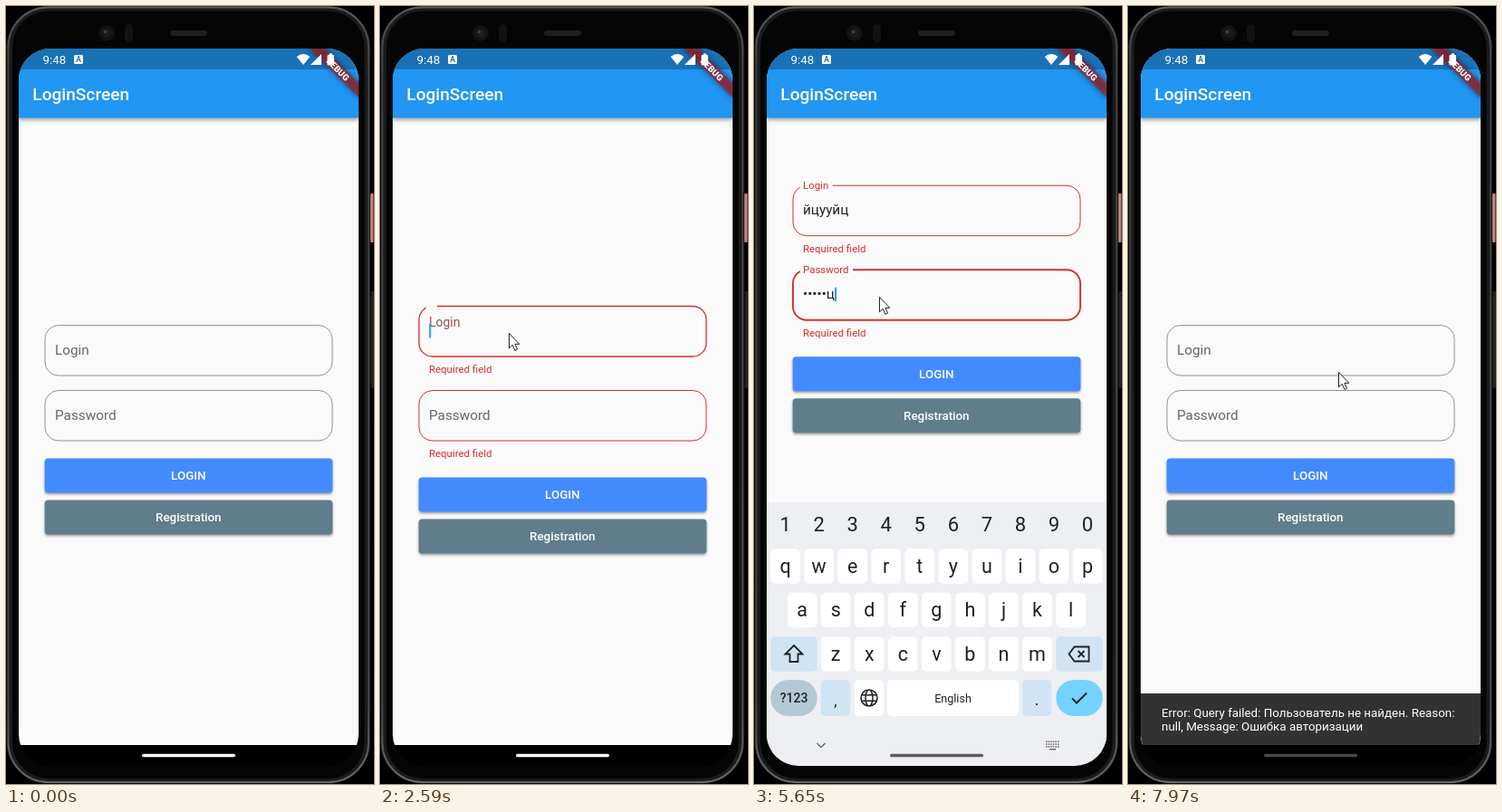
Write an HTML page with a canvas that moves like this. It is 406 px wide and 859 px high and loops after 8 s.

```html
<!DOCTYPE html>
<html lang="en">
<head>
<meta charset="utf-8">
<title>Login screen</title>
<style>
html, body { margin: 0; width: 100%; height: 100%; overflow: hidden; background: #000; }
canvas { display: block; width: 406px; height: 859px; }
</style>
</head>
<body>
<canvas id="stage"></canvas>
<script>
const W = 406, H = 859, LOOP = 8000;
const canvas = document.getElementById('stage');
const c = canvas.getContext('2d');
const dpr = window.devicePixelRatio || 1;
canvas.width = W * dpr;
canvas.height = H * dpr;

const RED = '#d32f2f', BLUE = '#2196f3', INK = '#202124';
const SCREEN = { x: 14, y: 47, w: 375, h: 792, r: 35 };

const clamp = v => Math.max(0, Math.min(1, v));
const ramp = (t, a, b) => clamp((t - a) / (b - a));
const mix = (a, b, k) => a + (b - a) * k;
const smooth = k => k * k * (3 - 2 * k);
const easeOut = k => 1 - (1 - k) ** 3;

// Cubic bezier (.4, 0, .2, 1)
function standard(k) {
  let lo = 0, hi = 1;
  for (let i = 0; i < 16; i++) {
    const m = (lo + hi) / 2, n = 1 - m;
    if (1.2 * n * n * m + 0.6 * n * m * m + m ** 3 < k) lo = m; else hi = m;
  }
  return 3 * lo * lo - 2 * lo ** 3;
}

function font(size, weight = 400) {
  c.font = `${weight} ${size}px Roboto, sans-serif`;
}
function text(s, x, y, size, color, weight, align = 'left') {
  font(size, weight);
  c.fillStyle = color;
  c.textAlign = align;
  c.fillText(s, x, y);
}
function box(x, y, w, h, r) {
  c.beginPath();
  c.roundRect(x, y, w, h, r);
}
function fillBox(x, y, w, h, r, color) {
  box(x, y, w, h, r);
  c.fillStyle = color;
  c.fill();
}
function strokeBox(x, y, w, h, r, width, color) {
  box(x, y, w, h, r);
  c.lineWidth = width;
  c.strokeStyle = color;
  c.stroke();
}
function dot(x, y, r, color) {
  c.beginPath();
  c.arc(x, y, r, 0, 7);
  c.fillStyle = color;
  c.fill();
}
function line(d, x, y, width = 1.6, color = INK) {
  c.save();
  c.translate(x, y);
  c.lineWidth = width;
  c.strokeStyle = color;
  c.stroke(new Path2D(d));
  c.restore();
}
function shape(d, x, y, color) {
  c.save();
  c.translate(x, y);
  c.fillStyle = color;
  c.fill(new Path2D(d));
  c.restore();
}
function shadow(blur, y, color) {
  c.shadowBlur = blur * dpr;
  c.shadowOffsetY = y * dpr;
  c.shadowColor = color;
}

function phone() {
  c.fillStyle = '#000';
  c.fillRect(0, 0, W, H);
  fillBox(402, 207, 3.5, 54, 1, '#c0807a');
  fillBox(402.5, 315, 3.5, 107, 1, '#222');
  const gloss = c.createLinearGradient(0, 0, 0, H);
  gloss.addColorStop(0, '#5c5c5c');
  gloss.addColorStop(0.08, '#3c3c3c');
  gloss.addColorStop(0.9, '#444');
  gloss.addColorStop(1, '#6a6a6a');
  fillBox(0.5, 0, 401.5, 858.5, 46, '#1b1b1b');
  strokeBox(2.5, 1.5, 397.5, 855.5, 44, 2, gloss);
  fillBox(7, 5.5, 388.5, 847.5, 40, '#050505');
  dot(111, 30, 9, '#121212');
  dot(111, 30, 5, '#1c1c20');
  dot(109.5, 28.5, 1.6, '#45454c');
  fillBox(131, 20, 9, 20, 4.5, '#121212');
  fillBox(181, 27, 41, 6, 3, '#1e1e1e');
}

function field(f, y) {
  const x = 43, w = 317, r = 15;
  font(15.3);
  const labelWidth = c.measureText(f.label).width * 0.75;
  c.save();
  if (f.float > 0) {
    c.beginPath();
    c.rect(0, y - 10, W, 90);
    c.rect(50.8, y - 4, (labelWidth + 7.6) * f.float, 10);
    c.clip('evenodd');
  }
  strokeBox(x, y, w, 55.5, r, f.focus ? mix(1, 1.9, f.float) : 1, f.error ? RED : '#929292');
  c.restore();

  const k = f.float;
  const color = `rgb(${mix(102, 211, k)},${mix(102, 47, k)},${mix(102, 47, k)})`;
  text(f.label, 54, y + mix(32.4, 4, k), mix(15.3, 11.45, k), color);
  text(f.value, 54, y + 32.2, 15.3, '#222');
  if (f.focus && f.caret) {
    c.fillStyle = BLUE;
    c.fillRect(54.3 + c.measureText(f.value).width, y + 19.5, 1.9, 15.5);
  }
  if (f.error) {
    c.save();
    c.globalAlpha *= f.errorAlpha;
    text('Required field', 54, y + 73.9, 11.45, RED);
    c.restore();
  }
}

function button(label, y, color, ink) {
  c.save();
  shadow(ink ? 5 : 3, ink ? 3 : 1.8, 'rgba(0,0,0,.38)');
  fillBox(42.7, y, 317.6, 38, 3.8, color);
  c.restore();
  if (ink) {
    c.save();
    box(42.7, y, 317.6, 38, 3.8);
    c.clip();
    c.fillStyle = `rgba(255,255,255,${0.11 * ink.alpha})`;
    c.fillRect(42, y, 319, 38);
    dot(ink.x, y + 19, ink.r, `rgba(255,255,255,${0.24 * ink.alpha})`);
    c.restore();
  }
  text(label, 201.3, y + 23.8, 13.36, '#fff', 500, 'center');
}

function page(p) {
  c.fillStyle = '#fafafa';
  c.fillRect(14, 47, 375, 769);
  const up = p.shift, grow = p.error ? 21 : 0;
  field(p.login, 352.5 - grow - up);
  field(p.password, 424.5 - up);
  button('LOGIN', 499.5 + grow - up, '#448aff', p.ink);
  button('Registration', 545.5 + grow - up, '#607d8b');
  c.save();
  shadow(4, 2, 'rgba(0,0,0,.35)');
  c.fillStyle = BLUE;
  c.fillRect(14, 47, 375, 76.5);
  c.restore();
  c.fillStyle = 'rgb(25,113,182)';
  c.fillRect(14, 47, 375, 23);
  text('LoginScreen', 29.3, 104, 19.1, '#fff', 500);
}

function banner() {
  c.save();
  c.translate(389, 47);
  c.rotate(Math.PI / 4);
  c.save();
  shadow(6, 0, 'rgba(0,0,0,.8)');
  c.fillStyle = 'rgba(183,28,28,.63)';
  c.fillRect(-38.2, 26.7, 76.4, 11.45);
  c.restore();
  text('DEBUG', 0, 35.9, 9.7, '#fff', 900, 'center');
  c.restore();
}

function statusBar() {
  text('9:48', 40.5, 64, 13.4, '#fff');
  fillBox(75, 54, 10, 10, 1.5, '#fff');
  text('A', 80, 62.2, 8.5, 'rgb(25,113,182)', 700, 'center');
  shape('M0 6L-7.3-3Q0-9 7.3-3Z', 328, 59, '#fff');
  shape('M6-6V6H-6Z', 342, 59, '#fff');
  fillBox(354.5, 54, 7.5, 11.5, 1, '#fff');
  c.fillRect(356.7, 52.4, 3.2, 2);
}

function key(x, y, w, color = '#fff', h = 38.5, r = 5) {
  fillBox(x - w / 2, y - h / 2, w, h, r, color);
}

function toolbar() {
  dot(36, 570.5, 14.5, '#74d2ff');
  line('M2-4.5l-4.5 4.5 4.5 4.5', 37, 570.5, 1.8);
  line('M-8-6q0-2 2-2h12q2 0 2 2v8l-6 6h-8q-2 0-2-2zM2 8v-4q0-2 2-2h4M-4 1q3 4 6 1', 89, 570.5, 1.8);
  dot(86, 568, 1.2, INK);
  dot(92, 568, 1.2, INK);
  text('GIF', 142, 575.2, 13, INK, 900, 'center');
  line('M-6.5-7h13v14.5h-13zM-2.5-7v-2h5v2M-3.5-2.5h7M-3.5.5h7M-3.5 3.5h4', 195, 570.5, 1.7);
  c.save();
  c.translate(247.5, 570.5);
  c.lineWidth = 4.4;
  c.strokeStyle = c.fillStyle = INK;
  c.beginPath();
  c.arc(0, 0, 4.7, 0, 7);
  c.stroke();
  for (let i = 0; i < 6; i++) {
    c.rotate(Math.PI / 3);
    c.fillRect(-2.2, -8.6, 4.4, 3);
  }
  c.restore();
  c.fillStyle = '#c9cbd0';
  c.fillRect(280, 560.5, 1, 20);
  for (let i = -1; i < 2; i++) dot(313 + i * 5.3, 570.5, 1.7, INK);
  fillBox(364, 561.5, 6, 11.5, 3, INK);
  line('M-5.8-1.5a5.8 5.8 0 0 0 11.6 0M0 4.5v4', 367, 571, 1.8);
}

function keyboard(english) {
  c.fillStyle = '#eeeff2';
  c.fillRect(14, 548, 375, 300);
  const step = 37.05, digits = '1234567890';
  if (!english) toolbar();
  [...'qwertyuiop'].forEach((ch, i) => {
    const x = 34.6 + i * step;
    key(x, 618.5, 32.5);
    text(ch, x, 625.5, 21.5, INK, 400, 'center');
    if (english) text(digits[i], x, 580, 22, INK, 400, 'center');
    else text(digits[i], x + 11.5, 610.5, 9, '#333', 400, 'center');
  });
  [['asdfghjkl', 53.2, 667], ['zxcvbnm', 90.2, 715.5]].forEach(([row, x0, y]) =>
    [...row].forEach((ch, i) => {
      key(x0 + i * step, y, 32.5);
      text(ch, x0 + i * step, y + 7, 21.5, INK, 400, 'center');
    }));
  const pale = '#d1e4f3';
  key(44, 715.5, 51.5, pale);
  line('M0-9.5l9.5 9.5h-5v8.5h-9v-8.5h-5z', 44, 715.5, 1.8);
  key(359, 715.5, 51.5, pale);
  line('M-11 0l6-8h16v16h-16zM-1-3.5l7 7M6-3.5l-7 7', 358.5, 715.5, 1.8);

  key(44, 764, 51.5, '#b3cad5', 40, 20);
  text('?123', 44, 769, 14, INK, 500, 'center');
  key(90, 764, 32.5, pale, 40);
  text(',', 90, 773, 17, INK, 400, 'center');
  if (!english) {
    line('M5 0a5 5 0 1 1-10 0 5 5 0 1 1 10 0M-2.6 1.2q2.6 3 5.2 0', 90, 756, 1.1);
    dot(88.2, 754.7, 0.8, INK);
    dot(91.8, 754.7, 0.8, INK);
  }
  key(127, 764, 32.5, '#fff', 40);
  line('M9 0a9 9 0 1 1-18 0 9 9 0 1 1 18 0M4 0a4 9 0 1 1-8 0 4 9 0 1 1 8 0M-8-3.2h16M-8 3.2h16', 127, 764, 1.5);
  key(219.5, 764, 145, '#fff', 40);
  text(english ? 'English' : 'EN • FI', 219.5, 769, 12.6, INK, 400, 'center');
  key(312, 764, 32.5, pale, 40);
  text('.', 312, 772, 19, INK, 400, 'center');
  key(359, 764, 51.5, '#74d2ff', 40, 20);
  line('M-8 0l5 5 11-11', 359, 764.5, 2);

  line('M-4.5-2l4.5 4.5 4.5-4.5', 74, 816, 1.4, '#666');
  c.fillStyle = '#666';
  for (let r = 0; r < 3; r++)
    for (let i = 0; i < 6; i++) c.fillRect(322 + i * 2.6, 811.5 + r * 2.8, 1.5, 1.5);
  c.fillRect(326, 820, 7, 1.4);
}

function snackbar(bottom, k) {
  if (k <= 0) return;
  const y = bottom - 57 * k;
  c.save();
  c.beginPath();
  c.rect(14, y, 375, bottom - y);
  c.clip();
  c.fillStyle = '#323232';
  c.fillRect(14, y, 375, 60);
  c.globalAlpha = ramp(k, 0.4, 1);
  text('Error: Query failed: Пользователь не найден. Reason:', 37, y + 25.5, 13.36, '#fff');
  text('null, Message: Ошибка авторизации', 37, y + 41.2, 13.36, '#fff');
  c.restore();
}

// time, x, y
const MOVES = [
  [340, 341, 846], [550, 292, 757], [720, 239, 655], [900, 209, 565], [1060, 195, 516],
  [1700, 195, 516], [1900, 168, 430], [2060, 147, 374], [2140, 147, 374],
  [2210, 133, 352], [2320, 142, 361], [4950, 142, 361], [5180, 138, 321],
  [5930, 138, 321], [6300, 172, 329], [6600, 210, 347], [6780, 231, 388], [6920, 232, 404]
];
function pointer(t) {
  if (t < MOVES[0][0]) return;
  let i = MOVES.findIndex(m => m[0] > t);
  if (i < 0) i = MOVES.length;
  const a = MOVES[i - 1], b = MOVES[i] || a;
  const k = a === b ? 0 : ramp(t, a[0], b[0]);
  c.save();
  c.translate(mix(a[1], b[1], k), mix(a[2], b[2], k));
  const arrow = new Path2D('M.5.5V16.8L4.2 13.3 6.9 19.4 9.5 18.2 6.9 12.3H11.8Z');
  c.fillStyle = '#fff';
  c.fill(arrow);
  c.lineWidth = 1;
  c.strokeStyle = '#222';
  c.stroke(arrow);
  c.restore();
}

function tapInk(t, start, x) {
  const age = t - start;
  if (age < 0 || age > 360) return null;
  return { x, r: 8 + age * 0.41, alpha: ramp(age, 0, 60) * (1 - ramp(age, 180, 360)) };
}

function passwordText(t) {
  const n = [5320, 5380, 5450, 5590, 5620, 5650, 5740, 5780].filter(s => t >= s).length;
  if (!n || n === 8) return '•'.repeat(n);
  return '•'.repeat(n - 1) + 'йцууйцу'[n - 1];
}

function draw(t) {
  const error = t >= 1600;
  const kb = smooth(ramp(t, 2690, 2990)) * (1 - easeOut(ramp(t, 7710, 7960)));
  const shift = 133.3 * kb;
  const typed = Math.floor(clamp((t - 4310) / 540) * 6);
  const lastEdit = t >= 5780 ? 5780 : t >= 5250 ? t : t >= 4850 ? 4850 : t >= 4390 ? t : 2490;
  const caret = Math.floor((t - lastEdit) / 500) % 2 === 0;
  const errorAlpha = ramp(t, 1600, 1770);
  const onPassword = t >= 5250;

  phone();
  c.save();
  box(SCREEN.x, SCREEN.y, SCREEN.w, SCREEN.h, SCREEN.r);
  c.clip();
  c.fillStyle = '#000';
  c.fillRect(14, 47, 375, 792);

  page({
    shift, error,
    ink: tapInk(t, 1400, 196) || tapInk(t, 7210, 230.5),
    login: {
      label: 'Login', value: 'йцууйц'.slice(0, typed), error, errorAlpha, caret,
      float: standard(ramp(t, 2533, 2733)), focus: t >= 2533 && !onPassword
    },
    password: {
      label: 'Password', value: passwordText(t), error, errorAlpha, caret,
      float: standard(ramp(t, 5220, 5420)), focus: onPassword
    }
  });
  const fresh = ramp(t, 7600, 7850);
  if (fresh > 0) {
    c.save();
    c.globalAlpha = fresh;
    const empty = label => ({ label, value: '', float: 0 });
    page({ shift, login: empty('Login'), password: empty('Password') });
    c.restore();
  }
  banner();
  statusBar();
  snackbar(816 - 268 * kb, easeOut(ramp(t, 7710, 7960)));
  c.fillStyle = '#000';
  c.fillRect(14, 816, 375, 23);
  if (kb > 0) {
    c.save();
    c.translate(0, 291 * (1 - kb));
    keyboard(t >= 4390);
    c.restore();
  }
  fillBox(150, 825.8, 103, 3.4, 1.7, t < 2760 ? '#fff' : t < 7800 ? '#5c5c5e' : '#484848');
  c.restore();
  pointer(t);
}

const begin = performance.now();
function frame() {
  c.setTransform(dpr, 0, 0, dpr, 0, 0);
  draw((performance.now() - begin) % LOOP);
  requestAnimationFrame(frame);
}
frame();
</script>
</body>
</html>
```
